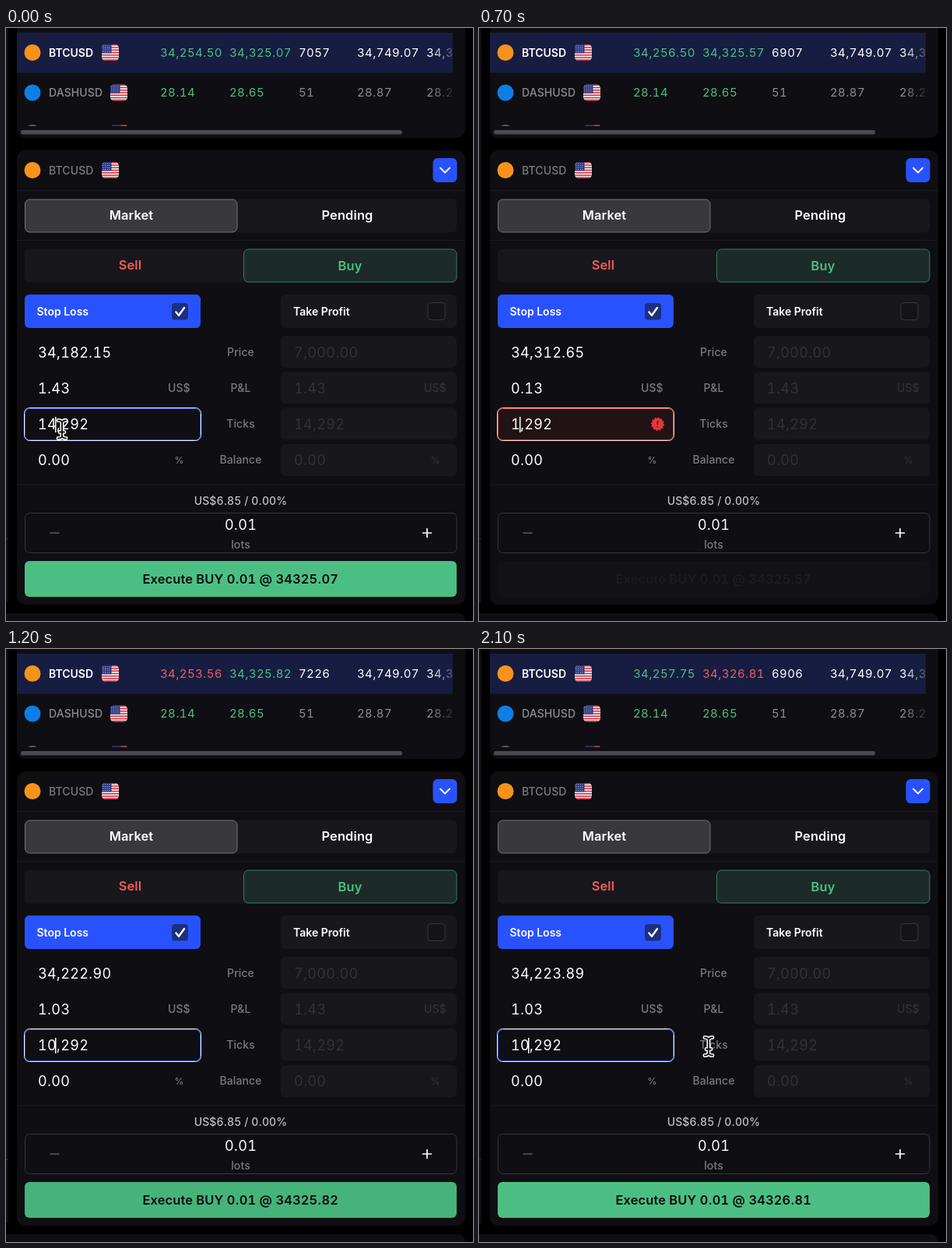
Write an HTML page that moves like this. It is 600 px wide and 761 px high and loops after 2200 ms.

```html
<!DOCTYPE html>
<html lang="en">
<head>
<meta charset="utf-8">
<title>Order ticket</title>
<style>
  html, body { margin: 0; width: 100%; height: 100%; overflow: hidden; background: #000; }
  svg { display: block; width: 600px; height: 761px; font-family: Inter, "Liberation Sans", sans-serif; font-optical-sizing: none; }
  text { white-space: pre; }
  .n { font-variant-numeric: tabular-nums; }
  .cell { font-size: 15px; letter-spacing: .35px; }
  .field { font-size: 18px; letter-spacing: .25px; }
  .small { font-size: 14px; font-weight: 500; letter-spacing: .1px; }
  .title { font-size: 14px; font-weight: 600; }
  .big { font-size: 16.4px; font-weight: 600; letter-spacing: .15px; }
  .tiny { font-size: 12px; font-weight: 500; }
  .mid { text-anchor: middle; }
</style>
</head>
<body>
<svg id="stage" viewBox="0 0 600 761" xmlns="http://www.w3.org/2000/svg">
  <defs>
    <linearGradient id="fade" gradientUnits="userSpaceOnUse" x1="546" y1="0" x2="577" y2="0">
      <stop offset="0" stop-color="#fff"/><stop offset="1" stop-color="#fff" stop-opacity=".12"/>
    </linearGradient>
    <linearGradient id="fadeDim" gradientUnits="userSpaceOnUse" x1="546" y1="0" x2="577" y2="0">
      <stop offset="0" stop-color="#8d8c91"/><stop offset="1" stop-color="#8d8c91" stop-opacity=".12"/>
    </linearGradient>
    <clipPath id="flagClip"><rect width="22" height="21" rx="5"/></clipPath>
    <clipPath id="listClip"><rect width="574" height="126"/></clipPath>
    <g id="flag" clip-path="url(#flagClip)">
      <rect width="22" height="21" fill="#f1eff2"/>
      <path id="stripes" stroke="#d0303f" stroke-width="1.62"/>
      <rect width="12.5" height="11.3" fill="#26337f"/>
      <path d="M1.5 2H12M1.5 4.5H12M1.5 7H12M1.5 9.5H12" stroke="#dfe1f2" stroke-width="1" stroke-dasharray="1 1.6"/>
    </g>
    <g id="beam" fill="none" stroke-linecap="round">
      <path id="beamShape" d="M-5-11.5Q0-11.5 0-8V8Q0 11.5-5 11.5M5-11.5Q0-11.5 0-8M5 11.5Q0 11.5 0 8M-3 3.5H3" stroke="#fff" stroke-width="4.6"/>
      <use href="#beamShape"/>
      <path d="M-5-11.5Q0-11.5 0-8V8Q0 11.5-5 11.5M5-11.5Q0-11.5 0-8M5 11.5Q0 11.5 0 8M-3 3.5H3" stroke="#0b0b0d" stroke-width="1.8"/>
    </g>
    <path id="arrow" d="M0 0V25L5.6 20 9.6 29.5 13.8 27.6 9.8 18.3H17.3Z" fill="#08080a" stroke="#fff" stroke-width="1.8" stroke-linejoin="round"/>
  </defs>
  <g id="base"></g>
  <g id="live"></g>
</svg>
<script>
const PANEL = '#0f0e12', BOX = '#18171b', GREY = '#8d8c91', LABEL = '#7b7a7f', FAINT = '#333237';
const GREEN = '#4bbf83', RED = '#f25c5c', BLUE = '#2952ff', WHITE = '#fff';
const LOOP = 2200, STEP = 100;
const $ = id => document.getElementById(id);

const rect = (x, y, w, h, fill, r = 0, extra = '') =>
  `<rect x="${x}" y="${y}" width="${w}" height="${h}" rx="${r}" fill="${fill}" ${extra}/>`;
const disc = (x, y, fill) => `<circle cx="${x}" cy="${y}" r="10.5" fill="${fill}"/>`;
const flag = (x, y) => `<use href="#flag" x="${x}" y="${y}"/>`;
const line = (d, stroke, width = 1) =>
  `<path d="${d}" fill="none" stroke="${stroke}" stroke-width="${width}" stroke-linecap="round" stroke-linejoin="round"/>`;
const text = (x, y, s, kind, fill, extra = '') =>
  `<text x="${x}" y="${y}" class="${kind}" fill="${fill}" ${extra}>` +
  s.replace('&', '&amp;').replace(/\d+/g, '<tspan class="n">$&</tspan>') + '</text>';
const money = v => {
  const [whole, cents] = v.toFixed(2).split('.');
  return whole.replace(/\B(?=(\d{3})+$)/g, ',') + '.' + cents;
};
const thousands = v => money(v).slice(0, -3);

function drawBase() {
  const rule = y => rect(14, y, 576, 1, '#1a191d');
  const panels = rect(0, -10, 3, 747, PANEL, 1) + rect(0, 655, 3, 1, '#29282c') +
    rect(14, -12, 576, 153, PANEL, 11) + rect(14, 157, 576, 583, PANEL, 11) +
    rect(-10, 751, 600, 30, PANEL, 9);

  const list = rect(14, 6, 560, 51.5, '#171d41') +
    disc(34, 31.5, '#f7931a') + text(55, 36.6, 'BTCUSD', 'title', WHITE) + flag(123, 21) +
    disc(34, 83, '#0c7fe6') + text(55, 88.2, 'DASHUSD', 'small', GREY) + flag(134, 72.5) +
    text(451, 36.9, '34,749.07', 'cell', WHITE) + text(540, 36.9, '34,3', 'cell', 'url(#fade)') +
    text(198, 88.3, '28.14', 'cell', GREEN) + text(287, 88.3, '28.65', 'cell', GREEN) +
    text(376, 88.3, '51', 'cell', GREY) + text(451, 88.3, '28.87', 'cell', GREY) +
    text(540, 88.3, '28.2', 'cell', 'url(#fadeDim)') +
    `<g clip-path="url(#listClip)" opacity=".6">${disc(34, 134.5, '#a58d62')}${flag(135, 124)}</g>` +
    rect(19, 131, 490, 5.5, '#4b4a4e', 2.7);

  const header = disc(34, 182.5, '#f7931a') + text(55, 187.7, 'BTCUSD', 'small', LABEL) + flag(123, 172) +
    rect(548.5, 167, 31, 31, BLUE, 6) + line('M558 179.5L564 185.5 570 179.5', WHITE, 1.8) +
    rule(208) + rule(272) + rule(585.5);

  const tabs = rect(24, 219.5, 555, 43, BOX, 6) +
    rect(24.5, 220, 272.5, 42, '#39383d', 6, 'stroke="#747378"') +
    text(161, 246.4, 'Market', 'big mid', WHITE) + text(438.5, 246.2, 'Pending', 'big mid', WHITE) +
    rect(24, 283.5, 555, 43, BOX, 6) +
    rect(305.5, 284, 273.5, 42, '#1c2b28', 6, 'stroke="#317e5a"') +
    text(159.5, 310.3, 'Sell', 'big mid', RED) + text(442, 310.8, 'Buy', 'big mid', GREEN);

  const toggles = rect(24, 342, 226, 43, BLUE, 6) + text(39.5, 368.6, 'Stop Loss', 'title', WHITE) +
    rect(213, 353, 21, 21.5, '#1c3080', 4) + line('M218.5 364.5L222 368.7 229 359', WHITE, 2.5) +
    rect(353, 342, 226, 43, BOX, 6) + text(369, 368.6, 'Take Profit', 'title', WHITE) +
    rect(542, 352.5, 22, 22, '#141317', 4, 'stroke="#37363b"');

  const rows = [['Price', '7,000.00'], ['P&L', '1.43'], ['Ticks', '14,292'], ['Balance', '0.00']];
  const fields = rows.map(([label, value], i) => {
    const y = 395 + i * 46.3;
    return rect(353, y, 226, 41, BOX, 6) + text(370, y + 27.5, value, 'field', FAINT) +
      text(301.5, y + 26.3 - i * .4, label, 'small mid', LABEL);
  }).join('') +
    text(208, 467, 'US$', 'small', LABEL) + text(537, 467, 'US$', 'small', FAINT) +
    text(216.5, 559, '%', 'tiny', LABEL) + text(545.5, 559, '%', 'tiny', FAINT) +
    text(41, 561, '0.00', 'field', WHITE);

  const lots = text(301.5, 611.6, 'US$6.85 / 0.00%', 'small mid', '#c0bfc2') +
    rect(24.5, 622.5, 554.5, 51, 'none', 6, 'stroke="#353439"') +
    text(301.5, 644.3, '0.01', 'field mid', WHITE) + text(301.5, 668.3, 'lots', 'small mid', LABEL) +
    line('M57 648H68', '#5d5c61', 1.6) + line('M535.5 648H546.5M541 642.5V653.5', WHITE, 1.7);

  $('stripes').setAttribute('d', Array.from({ length: 7 }, (_, i) => `M0 ${.8 + i * 3.23}H22`).join(''));
  $('base').innerHTML = panels + list + header + tabs + toggles + fields + lots;
}

// Each track lists [start time, ...values]; the latest entry applies.
const BIDS = [[0, 34254.50, GREEN], [300, 34253.27, RED], [600, 34256.50, GREEN],
  [900, 34256.06, RED], [1100, 34253.56, RED], [1400, 34257.75, GREEN]];
const ASKS = [[0, 34325.07, GREEN], [600, 34325.57, GREEN], [900, 34325.82, GREEN], [1400, 34326.81, RED]];
const TYPED = [[0, 14292], [300, 1292], [900, 10292]];
const APPLIED = [[0, 14292], [600, 1292], [1000, 10292]];
const CARET = [[0, 1], [500, 0], [700, 1], [1500, 0], [2000, 1]];
const BUTTON = [[0, GREEN, '#0a0b0c'], [600, '#275a41', '#101413'], [700, '#121115', '#1d1c20'],
  [800, BOX, '#353439'], [1100, '#32805a', '#0f1412'], [1200, '#46b37b', '#0a0b0c'], [1300, GREEN, '#0a0b0c']];
const at = (track, t) => track.filter(k => k[0] <= t).pop().slice(1);

function pointer(t) {
  if (t < 300) return '<use href="#beam" x="72" y="515"/>';
  if (t < 1500) return '';
  const back = t < 1700;
  const p = back ? (t - 1400) / 300 : (t - 1700) / 400;
  const x = back ? 72 + 106 * p : 178 + 117 * p;
  const y = back ? 515 + 14 * p : 529 - 19 * p;
  const overText = (x < 251 && y < 529) || x > 284;
  return `<use href="#${overText ? 'beam' : 'arrow'}" x="${x}" y="${y}"/>`;
}

function ticksField(t, ticks) {
  const error = t >= 600 && t < 1100;
  const badge = t >= 600 && t < 900;
  let s = rect(23.5, 487.5, 227, 42, error ? '#211216' : PANEL, 7, `stroke="${error ? '#f6dcd9' : '#f2f3fa'}"`) +
    rect(24.5, 488.5, 225, 40, 'none', 6, `stroke="${error ? '#d9413d' : BLUE}"`) +
    text(41, 514.8, thousands(ticks), 'field', WHITE);
  if (badge) s += '<circle cx="229.5" cy="508.3" r="7.5" fill="#ea373b" stroke="#ea373b" stroke-width="2" stroke-dasharray="2 1.9"/>' +
    line('M229.5 504.5V508.7M229.5 511.8V512', '#4d1216', 1.6);
  if (at(CARET, t)[0]) s += rect(ticks < 10000 ? 52 : 63, 499, 1.5, 20, WHITE);
  return s;
}

function draw(t) {
  const [bid, bidColor] = at(BIDS, t), [ask, askColor] = at(ASKS, t);
  const [ticks] = at(TYPED, t), [applied] = at(APPLIED, t);
  const [fill, ink] = at(BUTTON, t);
  $('live').innerHTML =
    text(198, 36.9, money(bid), 'cell', bidColor) + text(287, 36.9, money(ask), 'cell', askColor) +
    text(376, 36.9, String(Math.round((ask - bid) * 100)), 'cell', WHITE) +
    text(41, 422.5, money(ask - applied / 100), 'field', WHITE) +
    text(41, 468.8, money(applied / 10000), 'field', WHITE) +
    ticksField(t, ticks) +
    rect(24, 684, 555, 46, fill, 6) +
    text(301.3, 712.8, `Execute BUY 0.01 @ ${ask.toFixed(2)}`, 'big mid', ink) +
    pointer(t);
}

let shown = -1;
function tick() {
  const t = Math.floor(performance.now() % LOOP / STEP) * STEP;
  if (t !== shown) draw(shown = t);
  requestAnimationFrame(tick);
}
drawBase();
tick();
</script>
</body>
</html>
```
